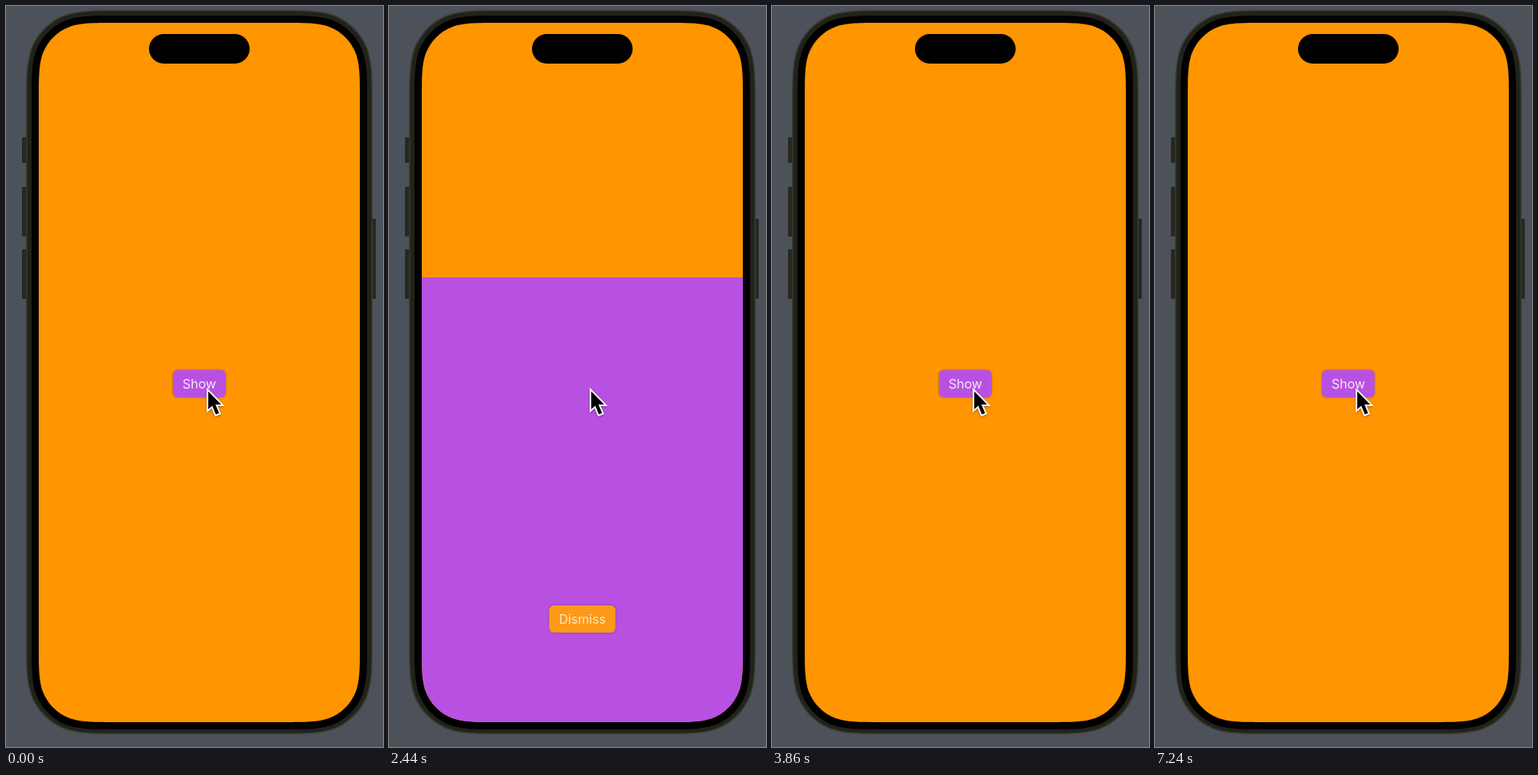
Animation of 472 by 926 pixels, one loop 7.26 s. Source, as an HTML page with a canvas:

```html
<!DOCTYPE html>
<html lang="en">
<head>
<meta charset="utf-8">
<title>Full screen cover</title>
<style>
html, body { margin: 0; width: 472px; height: 926px; overflow: hidden; background: #4d515a; }
canvas { display: block; width: 472px; height: 926px; }
</style>
</head>
<body>
<canvas id="stage"></canvas>
<script>
const W = 472, H = 926, LOOP = 7260;
const ORANGE = '#ff9500', PURPLE = '#b851e2';
const SCREEN = { x: 41, y: 21, w: 402, h: 874, r: 62 };
const CUT_IN = 780, CLOSED = 3040;

const canvas = document.getElementById('stage');
const ctx = canvas.getContext('2d');
const dpr = window.devicePixelRatio || 1;
canvas.width = W * dpr;
canvas.height = H * dpr;

const clamp = (v, a = 0, b = 1) => Math.min(b, Math.max(a, v));

// Rectangle with continuous-curvature corners.
function smoothRect(x, y, w, h, r) {
  const path = new Path2D();
  const corner = (cx, cy, ax, ay, bx, by) => {
    // u runs back along the incoming edge, v along the outgoing edge
    const p = (u, v) => [cx + (ax * u + bx * v) * r, cy + (ay * u + by * v) * r];
    path.lineTo(...p(1.5287, 0));
    path.bezierCurveTo(...p(1.0885, 0), ...p(0.8684, 0), ...p(0.6315, 0.0749));
    path.bezierCurveTo(...p(0.3728, 0.1691), ...p(0.1691, 0.3728), ...p(0.0749, 0.6315));
    path.bezierCurveTo(...p(0, 0.8684), ...p(0, 1.0885), ...p(0, 1.5287));
  };
  corner(x + w, y, -1, 0, 0, 1);
  corner(x + w, y + h, 0, -1, -1, 0);
  corner(x, y + h, 1, 0, 0, -1);
  corner(x, y, 0, 1, 1, 0);
  path.closePath();
  return path;
}

const rim = smoothRect(25, 5, 434, 905, 78);
const band = smoothRect(26.5, 6.5, 431, 902, 77);
const bezel = smoothRect(32, 12, 420, 892, 71);
const glass = smoothRect(SCREEN.x, SCREEN.y, SCREEN.w, SCREEN.h, SCREEN.r);
const arrow = new Path2D('M253.2 481.5V504L258.2 499.4L262.8 510.4L266.8 508.7L262.2 498H269.4Z');

function fillRound(x, y, w, h, r, color) {
  ctx.fillStyle = color;
  ctx.beginPath();
  ctx.roundRect(x, y, w, h, r);
  ctx.fill();
}

function button(label, cy, w, fill, ink) {
  ctx.save();
  ctx.shadowColor = 'rgba(70, 20, 20, .4)';
  ctx.shadowBlur = 3 * dpr;
  fillRound(242 - w / 2, cy - 17, w, 34, 6, fill);
  ctx.restore();
  ctx.fillStyle = ink;
  ctx.font = '400 16px Inter, Roboto, sans-serif';
  ctx.textAlign = 'center';
  ctx.textBaseline = 'alphabetic';
  ctx.fillText(label, 242, cy + 6.2);
}

function tickAt(t) {
  const u = t - 2060;
  const group = Math.floor(u / 140);
  const rest = u - group * 140;
  return group * 3 + (rest < 100 ? 0 : rest < 120 ? 1 : 2);
}

// Ease-in-out, cubic-bezier(.42, 0, .58, 1).
function ease(x) {
  let lo = 0, hi = 1;
  for (let i = 0; i < 24; i++) {
    const s = (lo + hi) / 2, q = 1 - s;
    if (1.26 * s * q * q + 1.74 * s * s * q + s * s * s < x) lo = s;
    else hi = s;
  }
  return lo * lo * (3 - 2 * lo);
}

function slide(tick) {
  const x = tick < 7 ? 0.1392 + tick * 0.04006 : 0.4196 + (tick - 7) * 0.04332;
  return Math.round(SCREEN.h * ease(clamp(x)));
}

function cover(t) {
  const tick = tickAt(t);
  const dy = slide(tick);
  // the pressed tint comes on quickly and fades slowly
  const press = clamp((tick + 7) / 2) * clamp((15 - tick) / 15);
  ctx.fillStyle = PURPLE;
  ctx.fillRect(SCREEN.x, SCREEN.y + dy, SCREEN.w, SCREEN.h);
  const fill = `rgb(${255 - 3 * press}, ${149 + 8 * press}, ${45 * press})`;
  const ink = `rgba(255, 246, 222, ${1 - 0.3 * press})`;
  button('Dismiss', Math.round(472 + dy * 0.926), 83, fill, ink);
}

function phone() {
  const key = '#272820';
  fillRound(20, 164, 7, 32, 1, key);
  fillRound(20, 226, 7, 62, 1, key);
  fillRound(20, 304, 7, 62, 1, key);
  fillRound(457, 266, 6, 100, 1, key);
  ctx.fillStyle = '#3a3b30';
  ctx.fill(rim);
  ctx.fillStyle = '#212219';
  ctx.fill(band);
  ctx.fillStyle = '#000';
  ctx.fill(bezel);
}

function pointer() {
  ctx.save();
  ctx.lineJoin = 'miter';
  ctx.strokeStyle = '#fff';
  ctx.lineWidth = 3.8;
  ctx.shadowColor = 'rgba(0, 0, 0, .35)';
  ctx.shadowBlur = 3 * dpr;
  ctx.shadowOffsetY = dpr;
  ctx.stroke(arrow);
  ctx.restore();
  ctx.fillStyle = '#000';
  ctx.fill(arrow);
}

function draw(t) {
  ctx.setTransform(dpr, 0, 0, dpr, 0, 0);
  ctx.fillStyle = '#4d515a';
  ctx.fillRect(0, 0, W, H);
  phone();
  ctx.save();
  ctx.clip(glass);
  ctx.fillStyle = ORANGE;
  ctx.fillRect(SCREEN.x, SCREEN.y, SCREEN.w, SCREEN.h);
  button('Show', 472, 66, PURPLE, '#f3e9f8');
  if (t >= CUT_IN && t < CLOSED) cover(t);
  ctx.restore();
  fillRound(179, 35, 126, 37, 18.5, '#000');
  pointer();
}

function loop() {
  draw(performance.now() % LOOP);
  requestAnimationFrame(loop);
}
loop();
</script>
</body>
</html>
```
